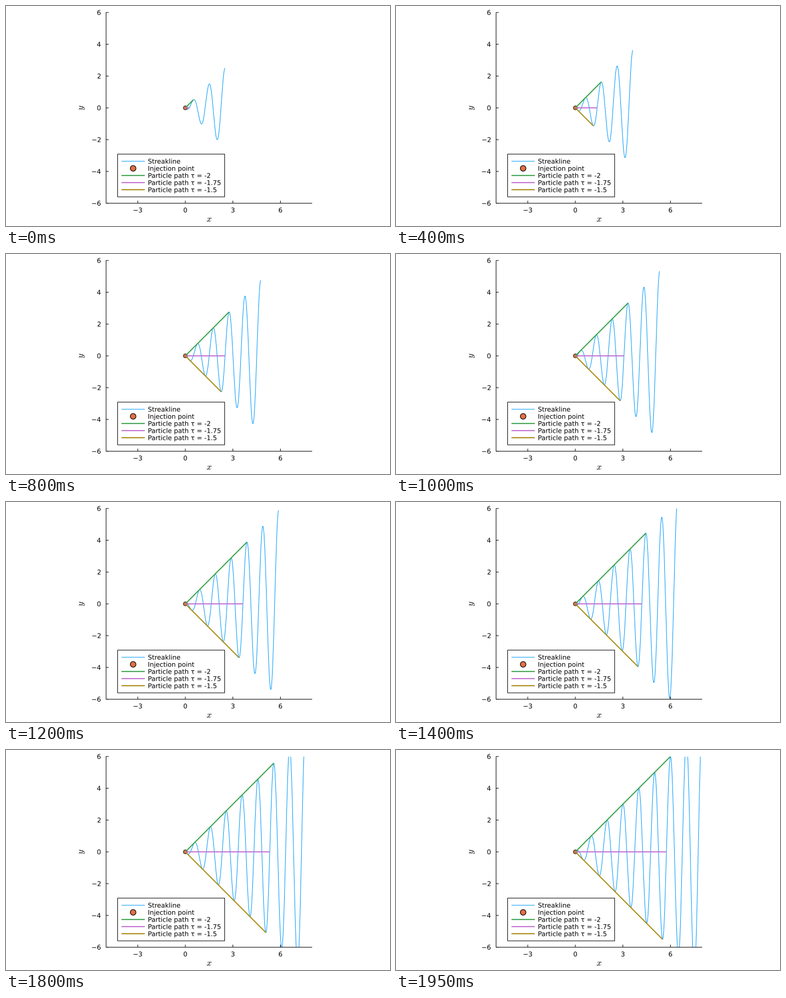
A matplotlib script for the animation above (2000 ms loop, 700x400 px).

```python
import numpy as np
import matplotlib.pyplot as plt
from matplotlib.animation import FuncAnimation
from matplotlib.patches import Circle, PathPatch, Rectangle
from matplotlib.textpath import TextPath
from matplotlib.transforms import Affine2D

W, H, DPI = 700, 400, 100
FRAMES, INTERVAL = 40, 50
PT = 72 / DPI  # points per pixel

BLUE, ORANGE = "#009AFA", "#E26F46"
PATHS = [(-2, "#3EA44E"), (-1.75, "#C371D2"), (-1.5, "#AC8E18")]
LEFT, TOP, BOTTOM = 182.4, 11.8, 358.6
UNIT = (BOTTOM - TOP) / 12
RIGHT = LEFT + 13 * UNIT
THIN, THICK, TICK = 1, 2, 4.7
FONT = 11.85
HALF_CAP = 0.729 * FONT / 2
ROW = 12.96

plt.rcParams.update({
    "font.family": "DejaVu Sans",
    "mathtext.fontset": "cm",
    "path.snap": False,
    "lines.solid_capstyle": "butt",
})

fig = plt.figure(figsize=(W / DPI, H / DPI), dpi=DPI, facecolor="white")
ax = fig.add_axes([LEFT / W, 1 - BOTTOM / H, (RIGHT - LEFT) / W, (BOTTOM - TOP) / H])
ax.set(xlim=(-5, 8), ylim=(-6, 6))
ax.set_axis_off()

# Pixel coordinates with the origin at the top left
pixels = Affine2D().scale(1 / W, -1 / H).translate(0, 1) + fig.transFigure


def to_px(x, y):
    return LEFT + (x + 5) * UNIT, TOP + (6 - y) * UNIT


def line(x, y, color="black", width=THIN):
    ax.plot(x, y, color=color, lw=width * PT, transform=pixels,
            clip_on=False, zorder=11)


def dot(x, y, radius, edge, zorder):
    ax.add_patch(Circle((x, y), radius, fc=ORANGE, ec="black", lw=edge * PT,
                        transform=pixels, clip_on=False, zorder=zorder))


def label(x, y, text, size=FONT, ha="left", middle=False, angle=0):
    """Text as outlines, on its baseline or centred on its ink."""
    path = TextPath((0, 0), text, size=size)
    path = path.transformed(Affine2D().rotate_deg(angle))
    box = path.get_extents()
    dx = {"left": 0, "center": (box.x0 + box.x1) / 2, "right": box.x1}[ha]
    dy = (box.y0 + box.y1) / 2 if middle else 0
    place = Affine2D().translate(-dx, -dy).scale(1, -1).translate(x, y)
    ax.add_patch(PathPatch(path, fc="black", lw=0, transform=place + pixels,
                           clip_on=False, zorder=12))


def number(v):
    return str(v).replace("-", "\u2212")


# Axes
line([LEFT, RIGHT], [BOTTOM, BOTTOM])
line([LEFT, LEFT], [TOP, BOTTOM])
for v in range(-3, 7, 3):
    x, _ = to_px(v, 0)
    line([x, x], [BOTTOM, BOTTOM - TICK])
    label(x, 375.3, number(v), ha="center")
for v in range(-6, 7, 2):
    _, y = to_px(0, v)
    line([LEFT, LEFT + TICK], [y, y])
    label(172.4, y + HALF_CAP, number(v), ha="right")
label(370.3, 388.5, "$x$", size=16.3, ha="center", middle=True)
label(138.3, 185.3, "$y$", size=16.3, ha="center", middle=True, angle=90)

# Legend
names = ["Streakline", "Injection point"]
names += [f"Particle path τ = {tau}" for tau, _ in PATHS]
key_height = (len(names) + 1) * ROW
key_bottom = BOTTOM - (BOTTOM - TOP) / 30
key_top = key_bottom - key_height
ax.add_patch(Rectangle((203.5, key_top), 195.1, key_height, fc="white", ec="black",
                       lw=THIN * PT, transform=pixels, clip_on=False, zorder=10))
rows = [key_top + (i + 1) * ROW for i in range(len(names))]
for y, name in zip(rows, names):
    label(258.6, y + HALF_CAP, name)
key_x = [210.5, 253]
line(key_x, [rows[0]] * 2, BLUE, THIN)
dot(sum(key_x) / 2, rows[1], 5.12, 1.14, 11)
for y, (_, color) in zip(rows[2:], PATHS):
    line(key_x, [y, y], color, THICK)

# Moving parts
streak, = ax.plot([], [], color=BLUE, lw=THIN * PT, zorder=3)
dot(*to_px(0, 0), 3.6, 0.8, 4)
trails = [ax.plot([], [], color=color, lw=THICK * PT, zorder=5)[0]
          for _, color in PATHS]


def position(t, tau):
    """Where a particle released at tau has drifted to by time t."""
    return t - tau, (t - tau) * np.cos(2 * np.pi * tau)


def update(i):
    t = -1.5 + 5.5 * i / (FRAMES - 1)
    streak.set_data(*position(t, np.linspace(-4, t, 900)))
    for trail, (tau, _) in zip(trails, PATHS):
        trail.set_data(*position(np.array([tau, max(t, tau)]), tau))
    return [streak, *trails]


anim = FuncAnimation(fig, update, frames=FRAMES, interval=INTERVAL,
                     repeat=True, repeat_delay=0)
plt.show()
```
